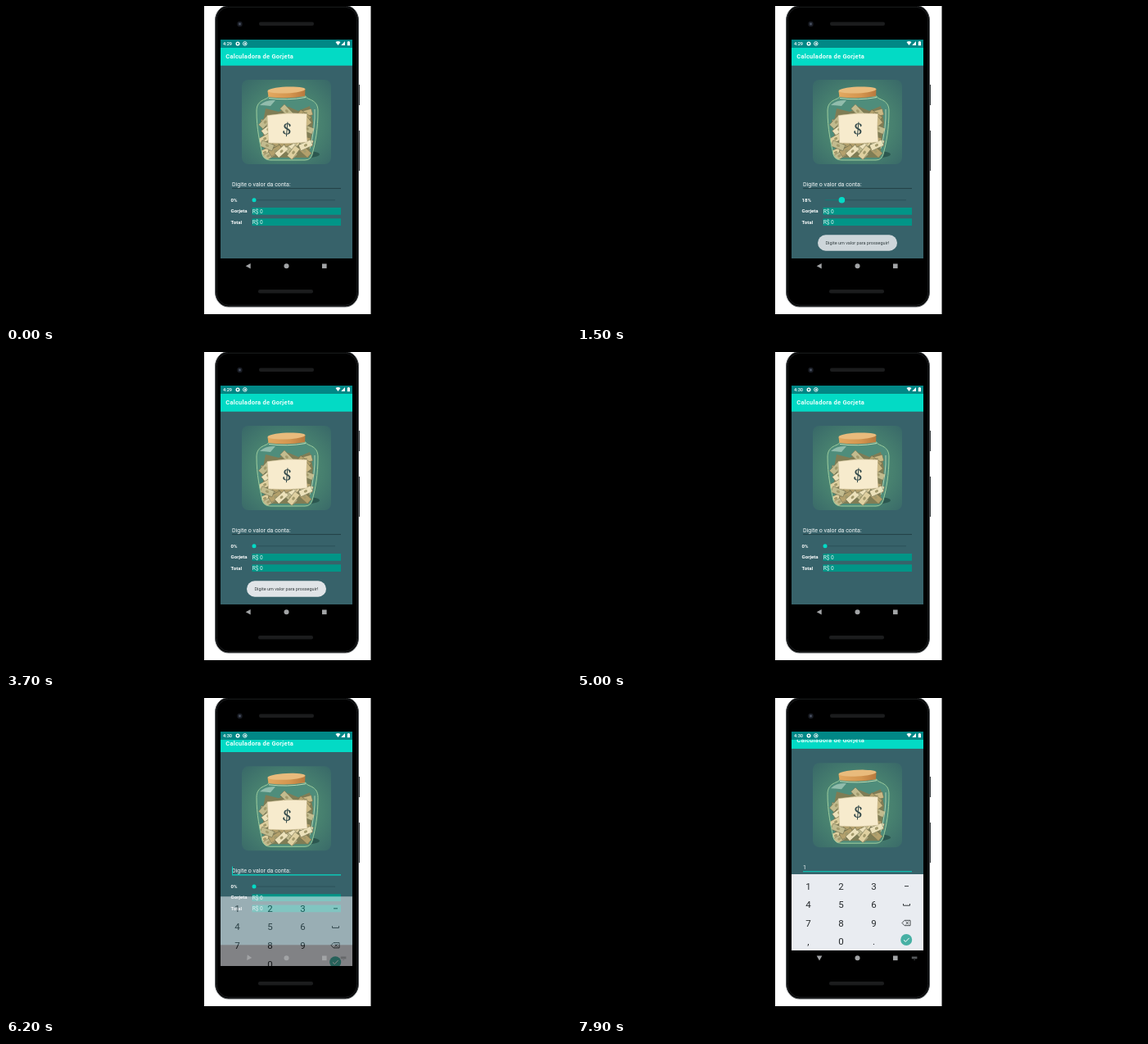
An HTML page that plays this animation: 690 px wide and 388 px high, repeating every 8000 ms.

```html
<!DOCTYPE html>
<html lang="pt">
<head>
<meta charset="utf-8">
<title>Calculadora de Gorjeta</title>
<style>
  html, body { margin: 0; width: 100%; height: 100%; overflow: hidden; background: #000; }
  svg { display: block; width: 100%; height: 100%; font-family: Roboto, sans-serif; }
  .title { font-size: 7.6px; font-weight: 600; letter-spacing: .03em; fill: #ecfffc; }
  .label { font-size: 6.1px; font-weight: 700; fill: #fff; }
  .value { font-size: 6.5px; fill: #e4f4f2; }
  .entry { font-size: 7.05px; fill: #f4f8f8; }
  .key { font-size: 11.5px; fill: #25292c; text-anchor: middle; }
</style>
</head>
<body>
<svg viewBox="0 0 690 388">
  <defs>
    <radialGradient id="glow" cx=".5" cy=".52" r=".68">
      <stop offset="0" stop-color="#5a9679"/>
      <stop offset=".6" stop-color="#47806f"/>
      <stop offset="1" stop-color="#3a6b69"/>
    </radialGradient>
    <linearGradient id="cork" x2="1">
      <stop offset="0" stop-color="#e2a860"/>
      <stop offset=".6" stop-color="#d3954f"/>
      <stop offset="1" stop-color="#b8793e"/>
    </linearGradient>
    <path id="jarShape" d="M321 110C320 115 306 113 306 128C306 150 310 166 313 181Q315 188 323 188H365Q372 188 374 181C378 166 381 150 381 128C381 113 367 115 366 110Z"/>
    <clipPath id="jarClip"><use href="#jarShape"/></clipPath>
    <clipPath id="appClip"><rect x="262" y="50.5" width="161" height="257.5"/></clipPath>
    <clipPath id="screenClip"><rect x="262" y="41" width="161" height="286"/></clipPath>
  </defs>

  <!-- phone -->
  <rect width="690" height="388"/>
  <rect x="242" width="203.5" height="376" fill="#fff"/>
  <path d="M431 96v25M431 152v49" stroke="#33373a" stroke-width="2"/>
  <rect x="255.5" y="-.5" width="175" height="367.5" rx="16" ry="18" stroke="#5b5f62"/>
  <rect x="257.3" y="1.3" width="171.4" height="363.9" rx="14.5" ry="16.5" fill="none" stroke="#1c1e20"/>
  <circle cx="285.5" cy="22" r="3.2" fill="#191c24"/>
  <circle cx="285.5" cy="22" r="1.4" fill="#4b5364"/>
  <rect x="309" y="19.5" width="67" height="4.5" rx="2" fill="#1b1c1d"/>
  <rect x="308" y="346" width="67" height="4.5" rx="2" fill="#1b1c1d"/>

  <g clip-path="url(#appClip)">
    <g id="app">
      <rect x="262" y="50" width="161" height="258" fill="#37626a"/>
      <rect x="262" y="40" width="161" height="32.7" fill="#03dac5"/>
      <text class="title" x="268.2" y="64.4">Calculadora de Gorjeta</text>

      <!-- tip jar -->
      <rect x="288" y="90" width="109" height="103" rx="8" fill="url(#glow)"/>
      <ellipse cx="358" cy="181" rx="25" ry="5" fill="#2c5850"/>
      <use href="#jarShape" fill="#4f8d7b"/>
      <g clip-path="url(#jarClip)">
        <path d="M313 146L317 125L333 129L345 123L357 128L371 122L375 142L370 185H317Z" fill="#7f7d55"/>
        <g id="bills" stroke="#6c6a4a" stroke-width=".5"></g>
      </g>
      <use href="#jarShape" fill="none" stroke="#9fcf9f"/>
      <path d="M310 121Q317 114 329 115L323 122Q315 121 310 121Z" fill="#b5d6c6" opacity=".65"/>
      <path d="M377 126Q378 147 371 174" fill="none" stroke="#c9e3bd" stroke-width=".8"/>
      <path d="M319.5 104L320.5 111Q343 114 365 110L365.5 101Z" fill="url(#cork)"/>
      <ellipse cx="342.5" cy="102.5" rx="23" ry="3.9" fill="#e9bb7c" transform="rotate(-3 342.5 102.5)"/>
      <path d="M321 112.5Q343 115.5 366 111.5" fill="none" stroke="#bcdcb4"/>
      <path d="M319 133.5Q343 129.5 367.5 131.5Q366 150 368 166Q344 169 320.5 167Q320 151 319 133.5Z" fill="#f7ebcd" stroke="#c7b78c" stroke-width=".5"/>
      <text x="343.2" y="157.6" font-size="21" font-weight="500" text-anchor="middle" fill="#344a4b" style="font-family:'Noto Serif',serif" transform="rotate(5 343 150)">$</text>

      <!-- form -->
      <text id="entry" class="entry" x="276" y="219.7"></text>
      <rect id="cursor" y="212.3" width=".9" height="9.7" fill="#03dac5"/>
      <path id="underline" d="M276 222.6H409"/>
      <text id="percent" class="label" x="274.6" y="239"></text>
      <path d="M303 236.8H402" stroke="#294d55" stroke-width=".8"/>
      <path id="track" stroke="#16877f" stroke-width=".9"/>
      <circle id="thumb" cy="236.8" fill="#03dac5"/>
      <text class="label" x="274.6" y="252.1">Gorjeta</text>
      <text class="label" x="274.6" y="265.5">Total</text>
      <path d="M300.5 246H409V254.8H300.5ZM300.5 259.3H409V268H300.5Z" fill="#019587"/>
      <text class="value" x="300.8" y="252.8">R$ 0</text>
      <text class="value" x="300.8" y="266.2">R$ 0</text>
    </g>
  </g>

  <g id="toast">
    <rect x="294" y="279.3" width="97" height="19.4" rx="9.7" fill="#e0e4e7"/>
    <text x="303.5" y="291" font-size="5.52" fill="#30383b">Digite um valor para prosseguir!</text>
  </g>

  <!-- status bar -->
  <rect x="262" y="41" width="161" height="9.5" fill="#018786"/>
  <g fill="#fff">
    <text id="clock" x="265" y="47.9" font-size="5.6" font-weight="500"></text>
    <circle cx="283" cy="45.9" r="1.8" fill="none" stroke="#fff" stroke-width="1.4"/>
    <circle cx="291.8" cy="45.9" r="2.3" fill="none" stroke="#fff" stroke-width=".9"/>
    <circle cx="292" cy="45.9" r="1"/>
    <path d="M402.5 44Q405.5 41.8 408.5 44L405.5 48ZM414 43V48H409.2ZM416.8 43.6H417.7V43H419V43.6H420V48.2H416.8Z"/>
  </g>

  <g clip-path="url(#screenClip)">
    <g id="keyboard">
      <rect x="262" y="215" width="161" height="93" fill="#e9ecf1"/>
      <rect x="262" y="308" width="161" height="93"/>
      <g id="keys"></g>
      <g fill="none" stroke="#34393c">
        <path d="M400 229.6H405M398.5 251V253.2H406.5V251"/>
        <path d="M400 271.3H407V277.7H400L397 274.5ZM401.5 272.8L405 276.2M405 272.8L401.5 276.2" stroke-width=".9"/>
      </g>
      <circle cx="402.2" cy="295" r="7" fill="#47b0a4"/>
      <path d="M399 295.2L401.3 297.4L405.6 292.9" fill="none" stroke="#fff"/>
    </g>
  </g>

  <!-- navigation -->
  <g fill="#a2a4a6">
    <path id="back" d="M292.7 317.3L298.7 314V320.6Z"/>
    <circle cx="342.5" cy="317.3" r="3"/>
    <rect x="386" y="314.5" width="5.6" height="5.6"/>
    <path id="hideKeys" d="M408.8 315.5H415.4V318.3H408.8ZM411 319L412.1 320.1L413.2 319Z" fill="#55585b"/>
  </g>
</svg>
<script>
const $ = id => document.getElementById(id);
const set = (id, attrs) => {
  for (const name in attrs) $(id).setAttribute(name, attrs[name]);
};
const ramp = (t, from, to) => Math.min(1, Math.max(0, (t - from) / (to - from)));
const HINT = 'Digite o valor da conta:';
const LOOP = 8000, STEP = 100;

function buildBills() {
  let seed = 7;
  const random = () => (seed = seed * 16807 % 2147483647) / 2147483647;
  const tones = ['#dfd0a0', '#cbb884', '#b3a06c', '#ece1ba', '#c2bb8e'];
  let markup = '';
  for (let i = 0; i < 46; i++) {
    const x = 316 + random() * 55, y = 128 + random() * 55;
    const angle = random() * 110 - 55, tone = tones[i % tones.length];
    markup += `<g transform="translate(${x} ${y}) rotate(${angle})">
      <rect x="-8" y="-3.8" width="16" height="7.6" fill="${tone}"/>
      <ellipse rx="2.2" ry="1.6" fill="#a39a6c" stroke="none"/></g>`;
  }
  $('bills').innerHTML = markup;
}

function buildKeys() {
  $('keys').innerHTML = ['123', '456', '789', ',0.'].map((row, r) =>
    [...row].map((key, c) =>
      `<text class="key" x="${282.5 + c * 40}" y="${233.5 + r * 22.6}">${key}</text>`
    ).join('')).join('');
}

// Slider position in percent: dragged out, held, dragged back.
const slide = t => 44 * (ramp(t, 1060, 2000) - ramp(t, 2680, 3300));

function draw(t) {
  const thumbX = 303 + slide(t) * 0.99;
  const pressed = (t >= 1100 && t < 2300) || (t >= 2700 && t < 3300);
  set('thumb', { cx: thumbX, r: pressed ? 3.8 : 2.5 });
  set('track', { d: `M303 236.8H${thumbX}` });
  $('percent').textContent = Math.round(slide(t - 50)) + '%';
  $('clock').textContent = t < 4500 ? '4:29' : '4:30';
  set('toast', { opacity: ramp(t, 1150, 1550) ** 0.8 * (1 - ramp(t, 4400, 4800)) });

  const focused = t >= 6000, typed = t >= 7000;
  const cursorOn = focused && Math.floor(t / 500) % 2 === 0;
  $('entry').textContent = typed ? '1' : HINT;
  set('cursor', { x: typed ? 280.3 : 276, opacity: +cursorOn });
  set('underline', {
    stroke: focused ? '#03dac5' : '#1d363c',
    'stroke-width': focused ? 1.1 : 0.8
  });

  const open = ramp(t, 6100, 6310);
  const lift = 1 - (1 - open) ** 1.5;
  set('app', { transform: `translate(0 ${-10.8 * lift})` });
  set('keyboard', {
    transform: `translate(0 ${93 * (1 - open) ** 1.9})`,
    opacity: open ** 0.8
  });
  set('back', { transform: `rotate(${-90 * lift} 296 317.3)` });
  set('hideKeys', { opacity: lift });
}

function tick() {
  const t = performance.now() % LOOP;
  draw(Math.floor(t / STEP) * STEP);
  requestAnimationFrame(tick);
}

buildBills();
buildKeys();
tick();
</script>
</body>
</html>
```
